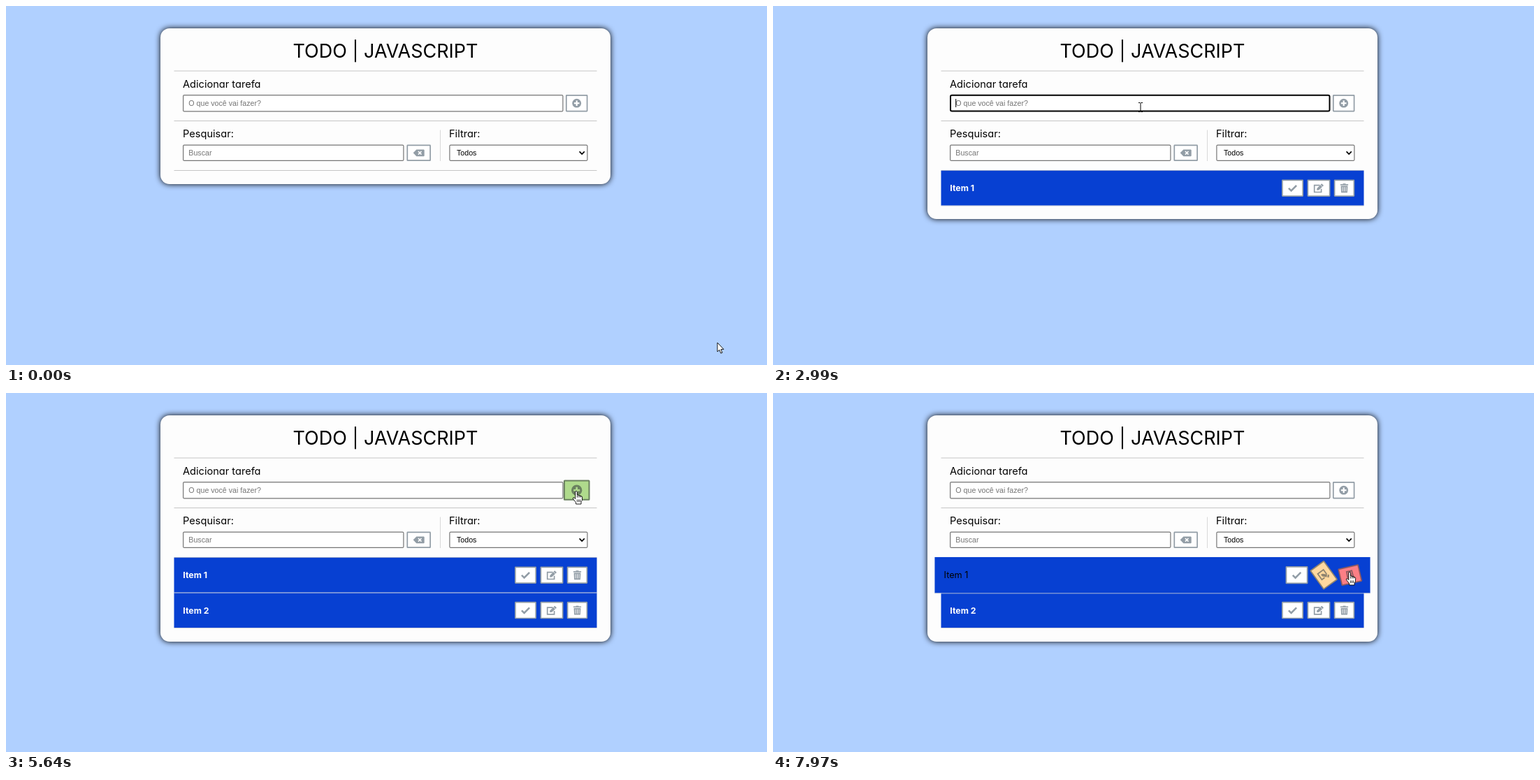
These frames come from a looping animation (1089 px wide and 514 px high, 8 s). An HTML page with a canvas:

```html
<!DOCTYPE html>
<html lang="pt-BR">
<head>
<meta charset="utf-8">
<title>Todo</title>
<style>
  html, body { margin: 0; width: 100%; height: 100%; overflow: hidden; background: #b0d0ff; }
  #card { position: absolute; left: 221px; top: 32px; width: 644px; height: 223px;
    border-radius: 13px; background: #fdfdfd; box-shadow: 0 0 8px #000; }
  .text { position: absolute; margin: 0; white-space: nowrap; color: #000;
    font: 400 14.6px/15px Inter, sans-serif; font-feature-settings: "cv11"; }
  h1.text { left: 221px; width: 644px; top: 50.7px; text-align: center; font-size: 27px; line-height: 27px; }
  canvas { position: absolute; left: 0; top: 0; }
</style>
</head>
<body>
<div id="card"></div>
<h1 class="text">TODO | JAVASCRIPT</h1>
<div class="text" style="left:253px;top:105.2px">Adicionar tarefa</div>
<div class="text" style="left:253px;top:176.2px">Pesquisar:</div>
<div class="text" style="left:634px;top:176.2px">Filtrar:</div>
<canvas id="stage" width="1089" height="514"></canvas>
<script>
const LOOP = 8000;
const ctx = document.getElementById('stage').getContext('2d');
const card = document.getElementById('card');
const FIELD_FONT = '10.67px "Liberation Sans", Arial, sans-serif';
const GREY = [146, 157, 166], WHITE = [255, 255, 255];
const GREEN = [174, 218, 139], ORANGE = [255, 186, 86], RED = [251, 94, 102];

// time, value of the field, start of the caret blink when it differs
const typing = [
  [0, ''], [860, '', 820],
  [1800, 'I'], [1930, 'It'], [2130, 'Ite'], [2310, 'Item'], [2510, 'Item '], [2660, 'Item 1'], [2990, '', 2690],
  [3390, 'I'], [3520, 'It'], [3720, 'Ite'], [3920, 'Item'], [4120, 'Item '], [4320, 'Item 2'], [5580, '']
];
const FOCUS = [860, 5500];

// time, x, y of the pointer
const path = [
  [0, 1018, 482], [30, 1018, 482], [460, 740, 290], [860, 530, 146], [1320, 530, 146], [1450, 526, 145],
  [4455, 526, 145], [4850, 727.5, 138], [5250, 806, 139], [5400, 816, 141], [5850, 816, 141],
  [6180, 788, 192], [6440, 763, 242], [6600, 751, 255], [6750, 746, 259], [6950, 750, 258],
  [7085, 766, 257], [7155, 771, 257], [7300, 782, 257], [7500, 792, 257], [7695, 805, 257],
  [7833, 810, 256], [7970, 825, 257], [8000, 827, 257]
];

const rowButtons = [
  { x: 743.5, w: 31, tint: GREEN, icon: checkIcon, hover: [6510, 7085] },
  { x: 781, w: 33, tint: ORANGE, icon: editIcon, hover: [7155, 7695] },
  { x: 817.5, w: 29.5, tint: RED, icon: trashIcon, hover: [7833, 9000] }
];

const within = (t, [a, b]) => t >= a && t < b;
const rgb = c => `rgb(${c.map(Math.round)})`;
const mix = (a, b, k) => a.map((v, i) => v + (b[i] - v) * k);

// CSS "ease": cubic-bezier(.25, .1, .25, 1)
function ease(x) {
  if (x <= 0) return 0;
  if (x >= 1) return 1;
  let lo = 0, hi = 1, s = 0.5;
  for (let i = 0; i < 20; i++) {
    s = (lo + hi) / 2;
    const at = 0.75 * s * (1 - s) ** 2 + 0.75 * s * s * (1 - s) + s ** 3;
    if (at < x) lo = s; else hi = s;
  }
  return 0.3 * s * (1 - s) ** 2 + 3 * s * s * (1 - s) + s ** 3;
}

function hoverLevel(t, [enter, leave]) {
  const level = ease((Math.min(t, leave) - enter) / 500);
  return t < leave ? level : level * (1 - ease((t - leave) / 500));
}

// Monotone cubic through the path points
function along(t, axis) {
  const n = path.length;
  let i = 0;
  while (i < n - 2 && path[i + 1][0] <= t) i++;
  const slope = k => k < 0 || k > n - 2 ? 0 :
    (path[k + 1][axis] - path[k][axis]) / (path[k + 1][0] - path[k][0]);
  const tangent = k => {
    const a = slope(k - 1), b = slope(k);
    return a * b <= 0 ? 0 : 2 * a * b / (a + b);
  };
  const span = path[i + 1][0] - path[i][0], u = (t - path[i][0]) / span;
  const p = path[i][axis], q = path[i + 1][axis];
  return p + (q - p) * u * u * (3 - 2 * u) +
    span * u * (1 - u) * ((1 - u) * tangent(i) - u * tangent(i + 1));
}

function rect(x, y, w, h, fill) {
  ctx.fillStyle = fill;
  ctx.fillRect(x, y, w, h);
}

function text(str, x, y, color, font = FIELD_FONT) {
  ctx.font = font;
  ctx.fillStyle = color;
  ctx.fillText(str, x, y);
}

function shape(points, fill, stroke, width = 1) {
  ctx.beginPath();
  points.forEach(([x, y]) => ctx.lineTo(x, y));
  if (fill) { ctx.closePath(); ctx.fillStyle = fill; ctx.fill(); }
  if (stroke) { ctx.strokeStyle = stroke; ctx.lineWidth = width; ctx.stroke(); }
}

function box(x, y, w, h, stroke, width, radius = 1.5, fill = '#fff') {
  ctx.beginPath();
  ctx.roundRect(x + width / 2, y + width / 2, w - width, h - width, radius);
  ctx.fillStyle = fill;
  ctx.fill();
  ctx.strokeStyle = stroke;
  ctx.lineWidth = width;
  ctx.stroke();
}

function plusIcon(color, back) {
  ctx.beginPath();
  ctx.arc(0, 0, 6.4, 0, 7);
  ctx.fillStyle = color;
  ctx.fill();
  rect(-3.8, -1.1, 7.6, 2.2, back);
  rect(-1.1, -3.8, 2.2, 7.6, back);
}

function eraseIcon(color, back) {
  shape([[-8, 0], [-3.3, -4.9], [7.2, -4.9], [8, -4.1], [8, 4.1], [7.2, 4.9], [-3.3, 4.9]], color);
  shape([[-0.8, -2.3], [3.8, 2.3]], null, back, 1.6);
  shape([[-0.8, 2.3], [3.8, -2.3]], null, back, 1.6);
}

function checkIcon(color) {
  shape([[-5.6, 0.2], [-1.9, 3.8], [5.6, -3.7]], null, color, 2.5);
}

function editIcon(color, back) {
  shape([[1.5, -4], [-6.3, -4], [-6.3, 5.8], [3.6, 5.8], [3.6, 1]], null, color, 1.7);
  shape([[-2.9, 3], [-2.5, 0.2], [4.2, -6.4], [7, -3.7], [0.2, 2.7]], color);
  shape([[2.3, -4.7], [5.2, -1.9]], null, back, 0.8);
}

function trashIcon(color, back) {
  rect(-5.6, -5.6, 11.2, 1.6, color);
  rect(-2, -6.5, 4, 1.2, color);
  shape([[-4.9, -3.2], [4.9, -3.2], [4.4, 6.5], [-4.4, 6.5]], color);
  for (const x of [-2.5, 0, 2.5]) rect(x - 0.45, -1.6, 0.9, 6.4, back);
}

function button(x, y, w, h, icon, { tint = GREEN, level = 0, turn = 0, scale = 1 } = {}) {
  const amount = level ** 0.3;
  const back = rgb(mix(WHITE, tint, amount));
  const ink = rgb(mix(GREY, tint.map(v => v * 0.55), amount * 0.8));
  ctx.save();
  ctx.translate(x, y);
  ctx.rotate(turn);
  ctx.scale(scale, scale);
  box(-w / 2, -h / 2, w, h, ink, 1.7, 0.5, back);
  icon(ink, back);
  ctx.restore();
}

function row(label, index, t) {
  const level = index ? 0 : ease((t - 6430) / 500);
  const scale = 1 + 0.03 * level, y = 260.7 + index * 50.4;
  ctx.save();
  ctx.translate(543, y);
  ctx.scale(scale, scale);
  ctx.translate(-543, 0);
  rect(240.5, -25, 605, 50, '#0740d2');
  rect(240.5, 25, 605, 0.8, '#c8cbd4');
  const weight = Math.round(700 - 300 * level);
  text(label, 253.3, 4.4, rgb(mix(WHITE, [0, 0, 0], level)), `${weight} 12.3px Inter, sans-serif`);
  for (const b of rowButtons) {
    const lit = index ? 0 : hoverLevel(t, b.hover);
    button(b.x, 0, b.w, 24.5, b.icon, { tint: b.tint, level: lit, turn: lit * 2 * Math.PI });
  }
  ctx.restore();
}

function taskField(t) {
  const [since, value, blink = since] = typing.findLast(s => s[0] <= t);
  const focused = within(t, FOCUS);
  if (focused) box(253, 126.8, 544.5, 24.8, '#000', 2, 2);
  else box(253, 127, 544.5, 24.5, '#767676', 1.2);
  text(value || 'O que você vai fazer?', 261.3, 142.8, value ? '#111' : '#757575');
  if (focused && (t - blink) % 1000 < 500) {
    const end = value ? ctx.measureText(value).width : 0;
    rect(261.2 + end, 133, 1, 12, '#000');
  }
}

function suggestions(t) {
  const rows = within(t, [1800, 2510]) || within(t, [3390, 4120]) ? 2 :
    within(t, [2510, 2660]) || within(t, [4120, 4320]) ? 1 : 0;
  if (!rows) return;
  ctx.save();
  ctx.shadowColor = 'rgba(0,0,0,.35)';
  ctx.shadowBlur = 3;
  ctx.shadowOffsetY = 1;
  ctx.beginPath();
  ctx.roundRect(333, 158.3, 58, 6.4 + 29 * rows, 3);
  ctx.fillStyle = '#292a2d';
  ctx.fill();
  ctx.restore();
  shape([[342.3, 158.6], [349, 152], [355.7, 158.6]], '#292a2d');
  ['Item 1', 'item1'].slice(0, rows).forEach((s, i) => text(s, 342.8, 180.6 + 29 * i, '#e8eaed'));
}

function arrow() {
  shape([[0, 0], [0, 13], [2.9, 10.4], [4.9, 15.2], [7, 14.3], [5, 9.7], [9, 9.5]], '#fff', '#000', 0.9);
}

function beam() {
  for (const s of [-1, 1]) {
    rect(-3, s * 6.5 - 0.5, 2.5, 1, '#000');
    rect(0.5, s * 6.5 - 0.5, 2.5, 1, '#000');
  }
  rect(-0.5, -6, 1, 12, '#000');
}

function hand() {
  ctx.lineJoin = 'round';
  shape([[-1.3, 0.3], [0, -0.7], [1.3, 0.3], [1.4, 5], [3.5, 5.2], [4, 6], [6, 6], [6.4, 6.8], [8, 7], [8.6, 8.2],
    [8.4, 12.5], [7, 15], [7, 18], [-0.3, 18], [-0.6, 15.5], [-4.6, 10.5], [-4.4, 9], [-3, 8.8], [-1.3, 10.5]],
    '#fff', '#000', 0.9);
  for (const x of [1.5, 3.8, 6.1]) shape([[x, 5.6], [x, 8.6]], null, '#000', 0.8);
  for (const x of [0.9, 3, 5.1]) rect(x, 11.5, 0.8, 3.5, '#000');
  ctx.lineJoin = 'miter';
}

function pointer(t) {
  const x = along(t, 1), y = along(t, 2);
  const over = (l, top, r, b) => x >= l && x < r && y >= top && y < b;
  const overRowButton = t > 6430 &&
    rowButtons.some(b => Math.abs(x - 543 - (b.x - 543) * 1.03) <= b.w * 0.52) && over(700, 248, 850, 274);
  const draw = over(253, 127, 797, 151.5) || over(253, 198.5, 569, 222) ? beam :
    over(801, 127, 833, 151.5) || over(574, 198.5, 608, 222) || overRowButton ? hand : arrow;
  ctx.save();
  ctx.translate(x, y);
  draw();
  ctx.restore();
}

function render(t) {
  const count = t < 2990 ? 0 : t < 5580 ? 1 : 2;
  card.style.height = 223 + 50.4 * count + 'px';
  ctx.clearRect(0, 0, 1089, 514);

  for (const y of [92.5, 164, 235]) rect(240.5, y, 605, 1, '#c6c6c6');
  rect(621, 177.5, 1, 44.5, '#d9d9d9');

  taskField(t);
  box(253, 198.5, 316.5, 23.5, '#767676', 1.2);
  text('Buscar', 261.3, 214, '#757575');
  button(590.7, 210.3, 34.5, 23.5, eraseIcon);
  box(634.3, 198.5, 198.2, 23.5, '#767676', 1.2);
  text('Todos', 645, 214, '#000');
  shape([[820.6, 208.4], [824.2, 212], [827.8, 208.4]], null, '#000', 1.7);

  for (let i = count - 1; i >= 0; i--) row('Item ' + (i + 1), i, t);

  const plus = hoverLevel(t, [5240, 5930]);
  button(816.7, 139.2, 31.5, 24.5, plusIcon, { level: plus, scale: 1 + 0.2 * plus });
  suggestions(t);
  pointer(t);
}

const start = performance.now();
function tick() {
  render((performance.now() - start) % LOOP);
  requestAnimationFrame(tick);
}
tick();
</script>
</body>
</html>
```
